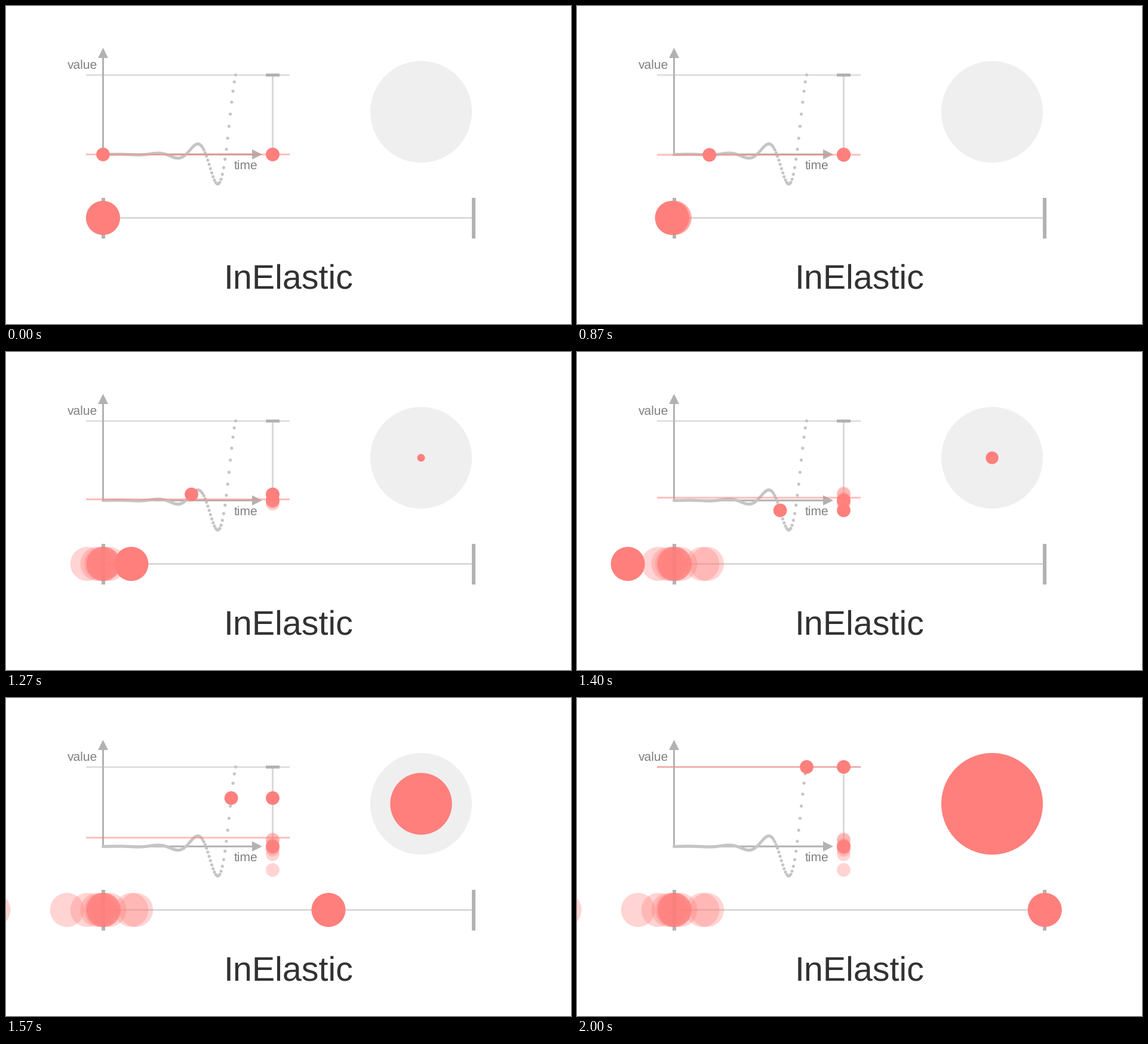
These frames come from a looping animation (946x532 px, 2.91 s). A matplotlib script:

```python
import numpy as np
import matplotlib.pyplot as plt
from matplotlib.animation import FuncAnimation
from matplotlib.collections import PatchCollection
from matplotlib.patches import Circle, Polygon

W, H, DPI = 946, 532, 100
PT = 72 / DPI                      # points per pixel
FRAMES, INTERVAL = 291, 10         # 2910 ms
STEP_RATE = 0.3                    # picture steps per frame, 30 a second
START, LENGTH = 18, 30             # in picture steps
GHOSTS = 12

RED, GREY, PALE = "#ff7f7c", "#b2b2b2", "#d9d9d9"
X0, XSPAN = 162.5, 222             # graph
Y0, YSPAN = 248.3, 133
COLUMN_X = 446.5
TRACK_X, TRACK_SPAN, TRACK_Y = 162.7, 620.5, 354.5
DISC_R = 85

plt.rcParams["font.family"] = "Liberation Sans"
plt.rcParams["text.hinting"] = "none"

fig = plt.figure(figsize=(W / DPI, H / DPI), dpi=DPI, facecolor="white")
ax = fig.add_axes([0, 0, 1, 1])
ax.set_xlim(0, W)
ax.set_ylim(H, 0)
ax.axis("off")


def in_elastic(t):
    return 2 ** (10 * (t - 1)) * np.cos(2 * np.pi * (t - 1) / 0.3)


def line(xs, ys, width, color, z=1, **kw):
    return ax.plot(xs, ys, color=color, lw=width * PT, zorder=z, snap=False,
                   solid_capstyle="butt", **kw)[0]


def disc(x, y, r, color=RED, z=5, **kw):
    return ax.add_patch(Circle((x, y), r, fc=color, lw=0, zorder=z, **kw))


def label(x, y, text, size, color):
    ax.text(x, y, text, fontsize=size * PT, color=color, va="baseline")


def graph_y(v):
    return Y0 - YSPAN * v


def track_x(v):
    return TRACK_X + TRACK_SPAN * v


# Graph
line([COLUMN_X] * 2, [115, Y0], 3, PALE)
line([134, 475], [115.5] * 2, 1, GREY)
line([435, 458], [115.5] * 2, 5, GREY)
line([X0] * 2, [85, Y0], 3, GREY)
line([X0, 414], [Y0] * 2, 3, GREY)
for head in ([(162.5, 70), (154, 87), (171, 87)],
             [(429, 248.3), (412, 239.8), (412, 256.8)]):
    ax.add_patch(Polygon(head, fc=GREY, lw=0, zorder=1))
dots = [Circle((X0 + XSPAN * t, graph_y(in_elastic(t))), 2.6)
        for t in np.linspace(0, 1, 101)]
ax.add_collection(PatchCollection(dots, fc="#c5c5c5", lw=0, zorder=2),
                  autolim=False)
label(103.3, 105, "value", 21, "#808080")
label(381.5, 273, "time", 21, "#808080")

# Scale disc, track and title
disc(695, 177, DISC_R, "#efefef", 1)
line([TRACK_X, TRACK_X + TRACK_SPAN], [TRACK_Y] * 2, 3, PALE)
for x in (163, 783):
    line([x] * 2, [321, 389], 6, GREY)
label(365, 472, "InElastic", 57.4, "#323232")

# Moving parts
level = line([134, 475], [Y0] * 2, 3, RED, 3, alpha=0.5)
ghosts = []
for j in range(GHOSTS):
    v = in_elastic(j / GHOSTS)
    ghosts.append((disc(COLUMN_X, graph_y(v), 11.4, z=4, alpha=0.33),
                   disc(track_x(v), TRACK_Y, 28.5, z=4, alpha=0.33)))
curve_dot = disc(X0, Y0, 11.4)
column_dot = disc(COLUMN_X, Y0, 11.4)
track_dot = disc(TRACK_X, TRACK_Y, 28.5)
scale_dot = disc(695, 177, 0)


def update(frame):
    step = int((frame + 0.5) * STEP_RATE)
    t, before = np.clip((np.array([step, step - 1]) - START) / LENGTH, 0, 1)
    v = in_elastic(t)
    y = graph_y(v)
    # the level line trails by one step
    level.set_ydata([graph_y(in_elastic(before))] * 2)
    curve_dot.center = X0 + XSPAN * t, y
    column_dot.center = COLUMN_X, y
    track_dot.center = track_x(v), TRACK_Y
    r = DISC_R * abs(v)
    scale_dot.set_radius(r)
    scale_dot.set_visible(r > 0.4)
    for j, pair in enumerate(ghosts):
        for ghost in pair:
            ghost.set_visible(t + 1e-9 >= j / GHOSTS)
    return []


anim = FuncAnimation(fig, update, frames=FRAMES, interval=INTERVAL,
                     repeat=True, repeat_delay=0, blit=False)
plt.show()
```
